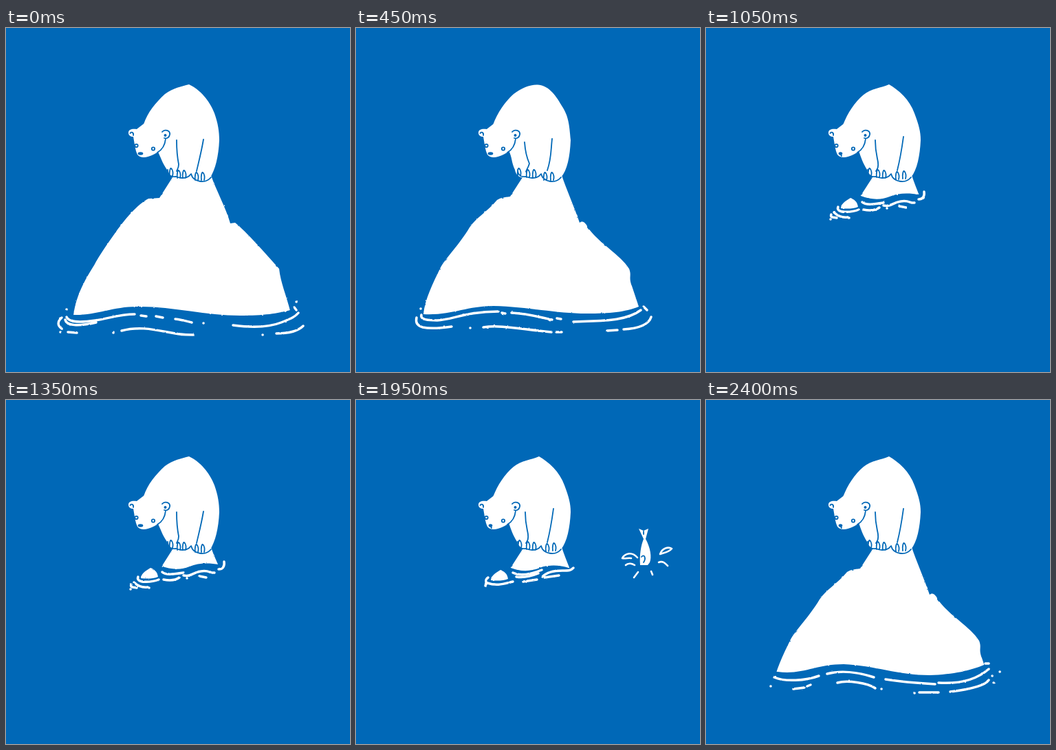
Animation, 500 px wide and 500 px high, one loop 2.55 s. Source, as an HTML page:

```html
<!DOCTYPE html>
<html lang="en">
<head>
<meta charset="utf-8">
<title>Polar bear</title>
<style>
  html, body { margin: 0; width: 100%; height: 100%; overflow: hidden; background: #0068b7; }
  svg { display: block; width: 100vw; height: 100vh; }
  .white { fill: #fff; }
  .blue { fill: #0068b7; }
  .ink, .foam { fill: none; stroke-linecap: round; stroke-linejoin: round; }
  .ink { stroke: #0068b7; stroke-width: 1.8; }
  .foam { stroke: #fff; stroke-width: 3.5; }
  .thin { stroke-width: 2.6; }
</style>
</head>
<body>
<svg id="stage" viewBox="0 0 500 500">
  <filter id="rough" filterUnits="userSpaceOnUse" x="-20" y="-20" width="540" height="540" color-interpolation-filters="sRGB">
    <feTurbulence type="fractalNoise" baseFrequency=".2" numOctaves="2" seed="4"/>
    <feDisplacementMap in="SourceGraphic" scale="2" xChannelSelector="R" yChannelSelector="G"/>
  </filter>
</svg>
<script>
const STEP = 150;
const path = (cls, d) => `<path class="${cls}" d="${d}"/>`;
const group = (content, transform = '') => `<g transform="${transform}">${content}</g>`;
const dot = (x, y) => `M${x} ${y}h.1`;

// Bear: three redrawn outlines share one head.
const bears = {
  sharp: {
    body: 'M266 82C280 90 296 104 303 124C309 140 312 150 312 163C311 185 307 206 298 217C290 226 274 224 269 214C264 219 254 218 247 216C240 217 236 214 234 206C228 196 225 188 222 178L199 141C206 123 216 108 229 97C240 88 255 87 266 82Z',
    legs: 'M246 163C246 180 249 188 250 195C251 203 249 205 247 208M287 158C284 180 281 195 278 207',
    toes: [[238, 209], [250, 211], [259, 212], [278, 214], [288, 213]], mouth: 1
  },
  round: {
    body: 'M264 82.5C278 83 289 95 299 113C309 128 310 140 312 163C311 187 307 207 298 217C290 225 274 223 268 216C262 220 252 220 247 216C238 220 232 213 231 206C226 196 227 188 222 178L199 141C206 122 217 107 229 96C241 87 253 82 264 82.5Z',
    legs: 'M245 166C246 180 248 188 252 197C250 204 248 205 247 209M285 161C283 180 284 190 278 207',
    toes: [[237, 209], [250, 211], [259, 211], [275, 215], [285, 215]], mouth: 0
  },
  slim: {
    body: 'M266 82C281 89 296 105 303 124C308 138 310 150 310 163C309 187 304 206 297 217C289 226 274 223 270 214C264 219 254 218 247 215C240 217 236 213 234 206C227 196 225 188 220 178L200 140C206 122 218 108 231 96C243 87 255 85 266 82Z',
    legs: 'M248 163C248 180 249 188 251 198C251 204 249 205 248 208M287 162C284 180 280 195 277 208',
    toes: [[240, 209], [251, 212], [259, 212], [277, 215], [286, 215]], mouth: 0
  }
};
const head = 'M203 137L190 147C184 146 178 147 178 152C178 156 181 158 185 158C187 169 188 178 191 184C195 190 206 188 212 185C222 181 231 173 232 161L225 145Z';
const toe = ([x, y]) => `M${x - 2} ${y + 6}C${x - 3} ${y - 1} ${x - 1} ${y - 6} ${x} ${y - 5}C${x + 3} ${y - 3} ${x + 3} ${y + 3} ${x + 2} ${y + 6}`;

function drawBear(name) {
  const { body, legs, toes, mouth } = bears[name];
  const ring = (x, y) => `<circle class="ink" cx="${x}" cy="${y}" r="2.2"/>`;
  const paws = 'M235 206C235 214 240 217 247 216C254 219 264 219 268 213M269 212C272 224 290 227 298 217';
  const face = 'M232 161C231 171 227 177 220 181M227 151C230 147 239 148 238 155C237 160 233 161 230 160M180.5 153C182 150 186 152 185 156';
  return path('white', body) + path('white', head) +
    path('ink', legs + paws + face + toes.map(toe).join('')) +
    ring(189.5, 171) + ring(214, 175.5) +
    `<circle class="blue" cx="231.5" cy="156" r="2"/><ellipse class="blue" cx="195.5" cy="182.5" rx="${mouth ? 2.8 : 3.8}" ry="2.2"/>` +
    (mouth ? path('ink', 'M196 184l1 2') : '');
}

// Ice reaches below every water line; the sea covers the rest.
const ice = {
  smooth: 'M244 214L223 247L207 248C190 257 173 278 160 296C147 314 136 330 128 345C120 358 102 385 98 418V440H415L413 411C408 390 399 370 397 350C375 325 350 297 333 283L326 284C320 262 305 235 298 214Z',
  craggy: 'M244 214L224 245C215 246 210 247 205 250C190 268 175 275 165 290C150 315 130 335 123 348C112 370 100 395 98 416V440H415L411 405L401 375C396 362 401 360 397 350C385 330 352 312 337 290C333 281 328 280 325 283C318 262 306 235 299 214Z'
};
const rock = 'M196 262C196 255 205 250 210 247C216 249 220 253 221 260C214 263 204 263 196 262Z';

const seas = {
  low: {
    line: 'L98 417C130 418 155 405 190 405C240 404 290 418 340 418C375 418 395 415 413 410L900 410',
    foam: 'M81 421C74 427 75 433 81 437M88 420C92 429 110 428 130 425S165 416 187 416M86 424C88 433 105 434 131 428M90 442L103 443M196 418l8 1M218 419l10 2M246 423C255 424 262 426 270 428M168 440C190 434 210 437 235 442S255 445 272 446M330 432C360 436 385 434 400 428S420 420 425 414M393 444C410 444 424 441 432 433M419 406l3 4' +
      dot(88, 409) + dot(79, 442) + dot(156, 443) + dot(287, 429) + dot(373, 446) + dot(422, 398)
  },
  ebb: {
    line: 'L98 416C140 418 160 404 200 404C250 405 290 415 335 415C370 415 390 413 411 405L900 405',
    foam: 'M88 421C86 429 90 433 97 435C110 438 125 436 139 434M95 417C93 424 105 425 118 425C140 424 160 412 207 412M185 435C210 431 240 438 284 442M212 414l5 1M226 414C250 415 265 420 285 424M291 442h8M292 422l6 1M316 427C350 425 390 428 414 410M365 440l15 -1M389 438C405 437 425 433 429 420M418 405l5 5' +
      dot(94, 408) + dot(166, 436)
  },
  flood: {
    line: 'L104 395C140 400 160 384 200 384C245 386 280 400 325 400C360 399 385 393 404 385L900 385',
    foam: 'M99 403C115 410 145 408 164 401M127 420L143 418M147 416l5 -2M176 398C195 393 220 395 244 403M191 411C205 407 235 411 246 419M261 406C280 409 300 411 333 413M310 425h28M338 411C370 413 395 405 411 391M355 424C380 421 405 416 411 407M406 383h5' +
      dot(94, 416) + dot(255, 420) + dot(303, 426) + dot(416, 401) + dot(418, 411) + dot(427, 395)
  },
  high: {
    line: 'L171 278C195 276 215 280 240 289C270 298 310 304 327 285L900 285',
    foam: 'M159 278C156 288 162 297 178 295M171 279C171 288 185 289 200 289M210 304C222 304 232 306 240 310S262 317 274 317M234 299C255 304 280 309 314 304M243 322C258 320 268 326 286 325M337 280C342 284 338 292 334 296M347 289C347 296 340 302 334 304M352 280C358 284 357 290 353 293' +
      dot(147, 290) + dot(170, 272) + dot(325, 310)
  },
  peak: {
    line: 'L225 244C240 250 255 250 267 245C280 239 297 240 309 242L900 242', rock,
    foam: 'M192 260C188 270 212 268 222 264M186 268C190 272 196 276 206 275M182 271C180 276 186 275 190 276M227 253C232 258 245 256 258 254M229 264C240 266 248 264 252 261M258 258C270 260 270 254 283 252S296 255 303 254M281 259l10 2M309 249C315 249 318 245 317 238' +
      dot(181, 278) + dot(208, 276) + dot(263, 262)
  },
  calm: {
    line: 'L225 244C240 250 255 249 267 244C280 239 297 240 309 244L900 244', rock,
    foam: 'M192 258C185 263 192 264 188 270M191 266C205 271 215 267 228 264M228 251C240 257 255 253 270 247M233 257C245 259 255 256 265 252M243 264l20 -3M271 257C278 249 290 248 300 248S312 248 316 244M274 258l21 -3'
  }
};

function drawSea(name, transform) {
  const { line, foam, rock = '' } = seas[name];
  const startY = line.match(/^L\d+ (\d+)/)[1];
  return group(path('blue', `M-400 ${startY}${line}V900H-400Z`) + path('white', rock) + path('foam', foam), transform);
}

const leap = path('white', 'M396 110C402 118 403 130 401 142C398 155 394 160 391 166L394 173L391 186L386 178L388 166C383 150 385 125 396 110ZM386 131C380 132 376 136 375 141C379 143 384 140 387 137ZM400 136C405 139 407 145 405 151C401 151 399 148 398 144Z') +
  path('ink', 'M397 121C401 122 400 126 398 126M389 134C393 140 390 152 387 157');
const burst = path('foam thin', 'M396 217C402 222 405 228 406 235M415 235C416 228 420 220 427 216' + dot(382, 218) + dot(398, 204) + dot(435, 217));
const dive = path('white', 'M411 187L418 190L425 187L421 202C428 215 430 228 427 236L424 240H413C412 225 414 212 418 202Z') +
  path('ink', 'M415 228C419 223 422 230 418 236M418 191v4');
const crown = path('foam thin', 'M409 229C400 219 390 224 387 230C392 231 396 229 400 230M442 224C445 215 454 213 459 216C455 221 448 222 442 224ZM392 240C396 236 402 238 405 240M440 236C446 233 450 238 453 241M410 250l-6 8M429 249l2 5');
const drops = path('foam thin', 'M388 229l4 -3M454 220l4 -2M450 238l3 2M394 239l3 -1');
const grow = s => `translate(420 240) scale(${s}) translate(-420 -240)`;
const fish = {
  rise: group(leap, 'translate(14 62)') + burst,
  leap: leap + burst,
  turn: group(leap, 'translate(13 -5) rotate(125 395 147)'),
  dive: dive + crown,
  splash: group(crown, grow(1.15)),
  drops: group(drops, grow(1.42))
};

// bear, ice, sea, sea transform, fish
const mid = 'translate(2 -46) scale(.96 1)';
const scenes = [
  ['slim', 'smooth', 'low'],
  ['round', 'craggy', 'low', 'translate(-8 7) scale(1.03 1)'],
  ['slim', 'smooth', 'low', 'translate(-3 -1)'],
  ['round', 'craggy', 'ebb'],
  ['slim', 'smooth', 'flood', mid],
  ['round', 'craggy', 'high'],
  ['slim', 'smooth', 'peak', 'translate(2 0)'],
  ['sharp', 'craggy', 'peak'],
  ['round', 'craggy', 'calm'],
  ['slim', 'smooth', 'peak', 'translate(0 -3)'],
  ['round', 'craggy', 'calm', '', 'rise'],
  ['sharp', 'craggy', 'peak', '', 'leap'],
  ['round', 'craggy', 'peak', 'translate(0 -3)', 'turn'],
  ['sharp', 'craggy', 'calm', '', 'dive'],
  ['round', 'craggy', 'high', '', 'splash'],
  ['slim', 'smooth', 'flood', mid, 'drops'],
  ['sharp', 'craggy', 'flood']
];

const stage = document.getElementById('stage');
const layers = scenes.map(([bear, berg, sea, shift, swimmer]) => {
  const layer = document.createElementNS('http://www.w3.org/2000/svg', 'g');
  layer.innerHTML = `<g filter="url(#rough)">${path('white', ice[berg])}${drawSea(sea, shift)}</g>` +
    drawBear(bear) + (fish[swimmer] || '');
  layer.style.display = 'none';
  return stage.appendChild(layer);
});

let shown = -1;
function render() {
  const index = Math.floor(performance.now() / STEP) % scenes.length;
  if (index !== shown) {
    if (shown >= 0) layers[shown].style.display = 'none';
    layers[index].style.display = '';
    shown = index;
  }
  requestAnimationFrame(render);
}
render();
</script>
</body>
</html>
```
